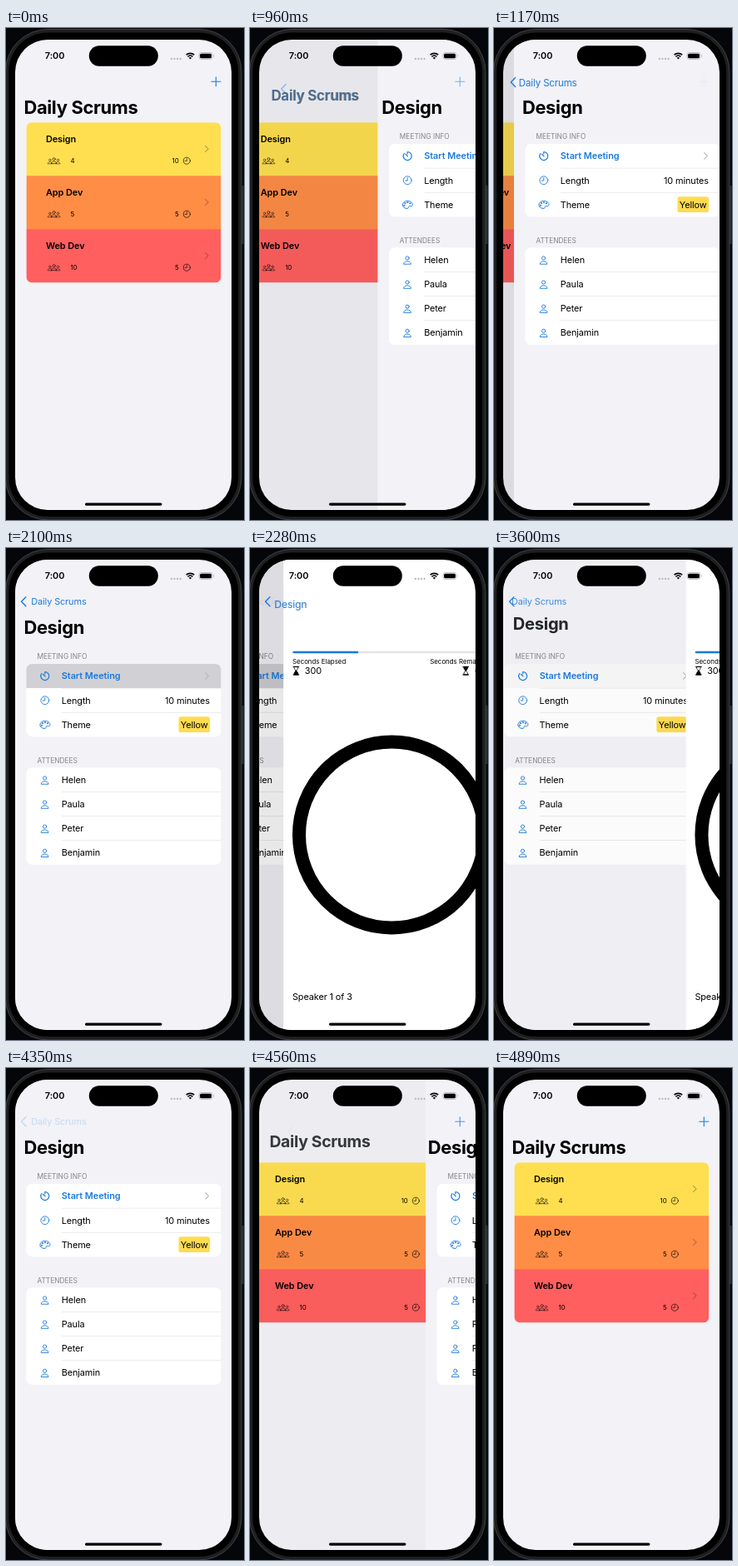
An HTML page that plays this animation: 286x590 px, repeating every 5.46 s.

```html
<!DOCTYPE html>
<html lang="en">
<head>
<meta charset="utf-8">
<title>Daily Scrums</title>
<style>
html, body { margin: 0; width: 100%; height: 100%; overflow: hidden; background: #050609; }
svg { display: block; width: 100vw; height: 100vh; }
text { font-family: Inter, "Open Sans", sans-serif; white-space: pre; }
.body { font-size: 10.9px; letter-spacing: -.01em; }
.head { font-size: 10.9px; letter-spacing: -.005em; font-weight: 600; }
.large { font-size: 21.9px; letter-spacing: -.015em; font-weight: 700; }
.section { font-size: 8.35px; fill: #85858a; }
.caption { font-size: 7.9px; }
.blue { fill: #1b7ade; }
.line { fill: none; stroke: #000; stroke-width: .8; stroke-linecap: round; stroke-linejoin: round; }
.line.tint { stroke: #1b7ade; stroke-width: .9; }
</style>
</head>
<body>
<svg id="stage" viewBox="0 0 286 590"></svg>
<script>
const LOOP = 5460, STEP = 30, WIDTH = 260, PARALLAX = 78;
const TITLE_RATIO = 2.03; // large title size relative to the back label
const BLUE = '#1b7ade';

// ---- drawing helpers ----
const text = (x, y, s, cls = 'body', anchor = 'start') =>
  `<text x="${x}" y="${y}" class="${cls}" text-anchor="${anchor}">${s}</text>`;
const rect = (x, y, w, h, fill, r = 0, more = '') =>
  `<rect x="${x}" y="${y}" width="${w}" height="${h}" rx="${r}" fill="${fill}" ${more}/>`;
const icon = (x, y, shapes, cls = '', scale = 1) =>
  `<g class="line ${cls}" transform="translate(${x} ${y}) scale(${scale})">${shapes}</g>`;
const path = (d, more = '') => `<path d="${d}" ${more}/>`;
const chevron = (x, y, color) =>
  path(`M${x - 2} ${y - 3.7}l3.7 3.7l-3.7 3.7`, `fill="none" stroke="${color}" stroke-width="1.1" stroke-linecap="round" stroke-linejoin="round"`);
const screen = (id, fill, content) =>
  `<g id="${id}">${rect(10.6, 14, WIDTH + 1, 564, fill)}${content}${rect(10.6, 14, WIDTH + 1, 564, '#000', 0, `id="${id}Dim" opacity="0"`)}</g>`;

const PERSON = '<circle cy="-2.5" r="2.1"/>' + path('M-4.4 4.4C-4.4 .2 4.4 .2 4.4 4.4Z');
const CLOCK = '<circle r="4.9"/>' + path('M0 -3V.3H-2.6');
const TIMER = path('M0 -5A5 5 0 1 1 -4 -3M0 -5V-2.6M-2.4 -2.2L.3 .4', 'stroke-width="1.2"');
const PALETTE = path('M-1 4.6C-7.5 4.2 -7.4 -2.6 -2 -4.2C3 -5.6 7.2 -2 6 1C5 3 2.4 .8 1.6 2C1 3.2 2.4 4.8 -1 4.6Z') +
  [[-4, 1], [-3, -1.7], [0, -2.7], [3, -1.6]].map(([x, y]) => `<circle cx="${x}" cy="${y}" r=".7"/>`).join('');
const hourglass = (x, topFull) => icon(x, 147.2,
  path('M-3.3 -4.7H3.3M-3.3 4.7H3.3', 'stroke-width="1.1"') +
  path('M-2.5 -4.5C-2.5 -1.6 -.6 -1 -.6 0H.6C.6 -1 2.5 -1.6 2.5 -4.5Z', `fill="${topFull ? '#000' : 'none'}"`) +
  path('M-2.5 4.5C-2.5 1.6 -.6 1 -.6 0H.6C.6 1 2.5 1.6 2.5 4.5Z', `fill="${topFull ? 'none' : '#000'}"`));

// ---- screens ----
const scrums = [['Design', 4, 10, '#ffdf50'], ['App Dev', 5, 5, '#ff8d46'], ['Web Dev', 10, 5, '#ff5f5e']];
const listScreen = screen('list', '#f2f2f7',
  `<g clip-path="url(#cards)">` + scrums.map(([name, people, minutes, color], i) => {
    const y = 113.2 + i * 64;
    return rect(24, y, 234, 64.5, color) + text(47.5, y + 24, name, 'head') +
      icon(52.4, y + 46.6, PERSON, '', .6) + icon(62, y + 46.6, PERSON, '', .6) +
      icon(57.2, y + 45.8, PERSON, '', .74) +
      text(77, y + 48.8, people, 'caption') + text(207.4, y + 48.8, minutes, 'caption', 'end') +
      icon(216.9, y + 46, CLOCK, '', .82) + chevron(241, y + 31.8, 'rgba(60,60,67,.36)');
  }).join('') + '</g>');

const ROW = 29.1;
const group = (top, rows, inner) =>
  rect(24, top, 234, rows * ROW, '#fff', 6.6) + inner +
  Array.from({length: rows - 1}, (_, i) => rect(66.8, top + (i + 1) * ROW - .3, 191.2, .6, '#dededf')).join('');
const attendees = ['Helen', 'Paula', 'Peter', 'Benjamin'];
const detailScreen = screen('detail', '#f2f2f7',
  text(37, 132.5, 'MEETING INFO', 'section') +
  group(139, 3,
    path('M24 168.1V145.6a6.6 6.6 0 0 1 6.6 -6.6H251.4a6.6 6.6 0 0 1 6.6 6.6V168.1Z', 'id="highlight" fill="#d1d1d5" opacity="0"') +
    icon(46.4, 153.5, TIMER, 'tint') + text(66.4, 157.4, 'Start Meeting', 'head blue') + chevron(241.3, 153.4, '#b5b5ba') +
    icon(46.4, 182.7, CLOCK, 'tint') + text(66.3, 186.6, 'Length') + text(244.5, 186.6, '10 minutes', 'body', 'end') +
    icon(46.4, 211.8, PALETTE, 'tint') + text(66.3, 215.7, 'Theme') +
    rect(207.1, 202.3, 37.5, 18.8, '#ffdb50', 2.7) + text(225.8, 215.7, 'Yellow', 'body', 'middle')) +
  text(37, 257.5, 'ATTENDEES', 'section') +
  group(263.3, 4, attendees.map((name, i) =>
    icon(46.2, 278.4 + i * ROW, PERSON, 'tint') + text(66.3, 281.8 + i * ROW, name)).join('')));

const meetingScreen = screen('meeting', '#fff',
  rect(21.7, 123.7, 238.5, 2.6, '#e4e4e6', 1.3) + rect(21.7, 123.7, 79, 2.6, BLUE, 1.3) +
  text(21.4, 138.5, 'Seconds Elapsed', 'caption') + text(260.3, 138.5, 'Seconds Remaining', 'caption', 'end') +
  hourglass(25.8, false) + text(36.2, 151.2, '300') + hourglass(229.7, true) + text(260.6, 151.2, '600', 'body', 'end') +
  '<circle cx="140.8" cy="344" r="111.4" fill="none" stroke="#000" stroke-width="16"/>' +
  text(21.4, 542.2, 'Speaker 1 of 3') +
  path('M245.6 534.5l6.3 3.9l-6.3 3.9ZM252.8 534.5l6.3 3.9l-6.3 3.9Z', `fill="${BLUE}" stroke="${BLUE}" stroke-width="1.4" stroke-linejoin="round"`));

// A large title that shrinks into the back label
const title = (id, s) =>
  `<g id="${id}">${text(0, 0, s, 'large')}<g transform="scale(${TITLE_RATIO})">${text(0, 0, s, 'body blue')}</g></g>`;

const statusBar =
  text(46.4, 37.3, '7:00', 'head') + rect(99.4, 21.3, 83, 24.4, '#000', 12.2) +
  [0, 1, 2, 3].map(i => `<circle cx="${198.4 + i * 3.6}" cy="37" r="1.15" fill="#b9b9bd"/>`).join('') +
  path('M216.2 32.2A7.2 7.2 0 0 1 225.8 32.2M218 34.3A4.6 4.6 0 0 1 224 34.3', 'fill="none" stroke="#000" stroke-width="1.6"') +
  path('M219.3 35.7A2.7 2.7 0 0 1 222.7 35.7L221 37.6Z') +
  rect(231.6, 29.6, 16, 7.8, 'none', 2.5, 'stroke="#a5a5a9" stroke-width=".7"') + rect(232.7, 30.7, 13.8, 5.6, '#000', 1.5) +
  path('M248.6 32.1q1.5 1.4 0 2.8Z', 'fill="#a5a5a9"') +
  rect(94.5, 569.4, 92.6, 3.4, '#000', 1.7);

document.getElementById('stage').innerHTML =
  `<defs><clipPath id="glass">${rect(10.6, 14, WIDTH, 564, '#000', 39)}</clipPath>
   <clipPath id="cards">${rect(24, 113.2, 234, 192, '#000', 6.6)}</clipPath></defs>` +
  rect(0, 0, 286, 590, '#050609') + rect(282, 189, 3.6, 70, '#2b2c2f', 1) +
  rect(-.5, 1.5, 283.5, 588.5, '#1e1f21', 51, 'stroke="#404144"') + rect(3.2, 5.5, 276, 580.5, '#000', 47) +
  `<g transform="translate(.4 0)"><g clip-path="url(#glass)">${listScreen}${detailScreen}${meetingScreen}` +
  path('M246.4 64.3h11M251.9 58.8v11', `id="plus" stroke="${BLUE}" stroke-width="1.1" stroke-linecap="round"`) +
  path('M23.5 58.8l-5.4 5.5l5.4 5.5', `id="back" fill="none" stroke="${BLUE}" stroke-width="1.4" stroke-linecap="round" stroke-linejoin="round"`) +
  title('listTitle', 'Daily Scrums') + title('detailTitle', 'Design') + statusBar + '</g></g>';

// ---- motion ----
const $ = id => document.getElementById(id);
const move = (id, x, y = 0, scale = 1) => $(id).setAttribute('transform', `translate(${x} ${y}) scale(${scale})`);
const fade = (id, opacity) => $(id).setAttribute('opacity', opacity);

// Critically damped spring from 0 to 1, settled once the rest is below a pixel
function spring(t, start, rate) {
  const u = Math.max(0, t - start) / 1000 * rate;
  return u > 8 ? 1 : 1 - (1 + u) * Math.exp(-u);
}

function setTitle(id, p, shift, labelOpacity) {
  move(id, 21 + 8.9 * p + shift, 103 - 35 * p, 1 + p * (1 / TITLE_RATIO - 1));
  const [large, label] = $(id).children;
  large.setAttribute('opacity', 1 - p);
  label.setAttribute('opacity', p * labelOpacity);
}

function draw(t) {
  const detail = spring(t, 860, 15.3) - spring(t, 4390, 16.5);
  const meeting = spring(t, 2100, 20.8) - spring(t, 3440, 20.8);
  const pressedFirst = t >= 3300 && t < 4350, pressedSecond = t >= 4350;

  move('list', -PARALLAX * detail);
  move('detail', WIDTH * (1 - detail) - PARALLAX * meeting);
  move('meeting', WIDTH * (1 - meeting));
  fade('listDim', .1 * detail);
  fade('detailDim', .1 * meeting);
  fade('highlight', t < 2100 ? 0 : t < 3440 ? 1 : meeting);

  setTitle('listTitle', detail, -60 * meeting, (1 - meeting) * (pressedSecond ? .2 : 1));
  setTitle('detailTitle', meeting, 250 * (1 - detail), pressedFirst ? .2 : 1);
  fade('plus', 1 - detail);
  move('back', 35 * (1 - detail), 16 * (1 - detail));
  fade('back', detail * (pressedSecond ? .2 : pressedFirst ? 1 - .8 * meeting : 1));
}

const began = performance.now();
function tick() {
  const t = (performance.now() - began) % LOOP;
  draw(Math.floor(t / STEP) * STEP);
  requestAnimationFrame(tick);
}
tick();
</script>
</body>
</html>
```
